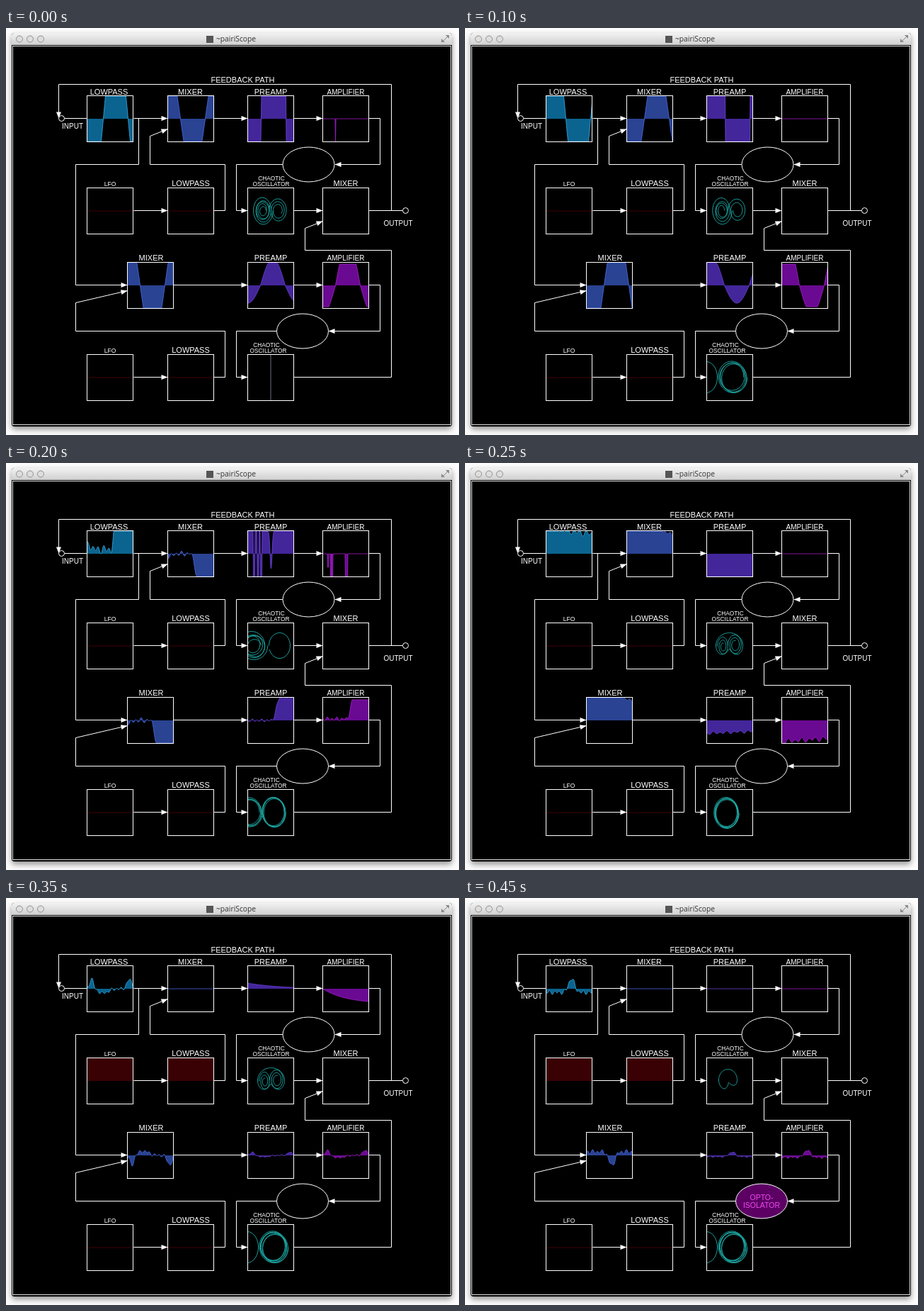
Recreate the animation shown at these times as an HTML page with a canvas. Size 640 px wide and 574 px high, loop 500 ms.

```html
<!DOCTYPE html>
<html lang="en">
<head>
<meta charset="utf-8">
<title>~pairiScope</title>
<style>
  html, body { margin: 0; width: 100%; height: 100%; overflow: hidden; background: #fdfdfd; }
  canvas { display: block; }
</style>
</head>
<body>
<canvas id="stage" width="640" height="574"></canvas>
<script>
const ctx = document.getElementById('stage').getContext('2d');
const { PI, sin, cos, abs, exp, sign, min, max } = Math;
const STEP = 50, SIZE = 65, MID = 32.5, MAX = 32;
const SANS = '"Liberation Sans", Arial, sans-serif';
const TEAL = '#1fb3ae';

const COLORS = {
  cyan: ['#0b648f', '#35a3d6'],
  blue: ['#2a4392', '#4766dc'],
  violet: ['#43269a', '#6a42d4'],
  purple: ['#6a0a92', '#a31cc8'],
  red: ['#390104', '#520008']
};

const BOX = {
  low: [114, 95], mix: [228, 95], pre: [341, 95], amp: [447, 95],
  lfo: [114, 225], lfoLow: [228, 225], chaos: [341, 225], out: [447, 225],
  mix2: [171, 330], pre2: [341, 330], amp2: [447, 330],
  lfo2: [114, 460], lfoLow2: [228, 460], chaos2: [341, 460]
};

const TRACES = {
  low: 'cyan', mix: 'blue', pre: 'violet', amp: 'purple',
  mix2: 'blue', pre2: 'violet', amp2: 'purple',
  lfo: 'red', lfoLow: 'red', lfo2: 'red', lfoLow2: 'red'
};

// Signals map x in a box (0 to SIZE) to a height above its middle line.
const clip = (v, limit = MAX) => max(-limit, min(limit, v));
const level = v => () => v;
const gain = (signal, k) => x => k * signal(x);
const wave = (x, zero) => sin(PI * (x - zero) / 35);
const bump = (x, at, width) => exp(-(((x - at) / width) ** 2));
const near = (x, width, ...centers) => centers.some(c => abs(x - c) <= width);
const ripple = (x, seed = 0) => sin(x * 0.92 + seed) + 0.6 * sin(x * 0.53 + 2 * seed);
function ramp(x, from, to) {
  const k = max(0, min(1, (x - from) / (to - from)));
  return k * k * (3 - 2 * k);
}

// Ellipses traced turn after turn, shrinking to "end" and wandering by "spread".
function orbit(cx, cy, rx, ry, { turns = 1, end = 1, spread = 0, start = 0 } = {}) {
  ctx.beginPath();
  const steps = Math.ceil(turns * 48);
  for (let i = 0; i <= steps; i++) {
    const k = i / steps, a = start + k * turns * 2 * PI;
    const r = 1 + (end - 1) * k + spread * sin(a * 0.38);
    const drift = spread * rx * cos(a * 0.61);
    ctx.lineTo(cx + drift + cos(a) * rx * r, cy + sin(a) * ry * r);
  }
  ctx.stroke();
}

// A ring dented from below.
function bean(cx, cy, rx, ry, dent) {
  ctx.beginPath();
  for (let a = -PI / 2; a <= PI * 1.5; a += 0.06) {
    const r = 1 - 0.75 * bump(a, dent, 0.5);
    ctx.lineTo(cx + cos(a) * rx * r, cy + sin(a) * ry * r);
  }
  ctx.closePath();
  ctx.stroke();
}

const rod = () => {
  ctx.fillStyle = '#776f80';
  ctx.fillRect(32, 0, 1, SIZE);
};
const coil = (turns, spread) => () => {
  orbit(-1, 32, 16, 22);
  orbit(37, 32, 18.5, 21, { turns, spread, end: 0.92 });
};
const butterfly = (left, right) => () => {
  orbit(21.5, 32, 13.5, 19.5, { turns: left, end: 0.3, spread: 0.05 });
  orbit(43, 32, 13, 17.5, { turns: right, end: 0.42, start: PI });
};
const heart = dx => () => {
  bean(32 + dx, 32, 19, 18, PI / 2);
  orbit(23 + dx, 33, 8, 14, { turns: 2.3, end: 0.3, start: PI });
  orbit(40 + dx, 31, 10, 15, { turns: 2.3, end: 0.4, start: PI });
};

// Clipped oscillation running through both chains.
function oscillating(lowZero, mixZero, extra) {
  const mix = x => clip(-80 * wave(x, mixZero));
  const pre2 = x => {
    const s = wave(x, mixZero);
    return clip(s * (s > 0 ? 38 : 25));
  };
  return {
    low: x => clip(120 * wave(x, lowZero)),
    mix, mix2: mix, pre2,
    pre: x => MAX * sign(wave(x, mixZero + 1)),
    amp2: x => clip(1.6 * pre2(x), 30),
    ...extra
  };
}

// Signals held near a rail; "sag" is how far they drop towards the right.
function saturated(sag, extra) {
  const mix = x => min(MAX, MAX - sag * (0.5 * ramp(x, 48, 65) + 0.14 * ramp(x, 48, 52) * ripple(x, 5)));
  const pre2 = x => -18 + sag * 0.33 * x / SIZE + 1.4 * ripple(x * 0.7, 2);
  return {
    low: x => min(MAX, 36 - sag * x / SIZE + 3 * ripple(x * 0.8, 4)),
    mix, mix2: mix, pre: level(-MAX), pre2,
    amp2: x => clip(1.65 * pre2(x)),
    chaos: heart(0),
    chaos2: () => orbit(28, 33, 17, 21.5, { turns: 5, end: 0.9, spread: 0.04 }),
    ...extra
  };
}

// Small ripples, with the slow oscillator at its top.
function quiet(low, extra) {
  return {
    low, mix2: gain(low, -1), pre2: gain(low, 0.33), amp2: gain(low, 0.52),
    lfo: level(MAX), lfoLow: level(MAX),
    chaos: heart(1), chaos2: coil(6, 0.09),
    ...extra
  };
}

const dip = x => 2 * ripple(x * 0.5, 2) * (1 - ramp(x, 14, 18)) - MAX * ramp(x, 16, 23);
const chatter = x => 6 + 4 * ripple(x * 0.9, 1) + 7 * bump(x, 3, 4);
const burst = x => -0.6 * (chatter(x) - 6) * (1 - ramp(x, 26, 34)) - MAX * ramp(x, 34, 41);
const twinLobes = x => 15 * bump(x, 6.5, 3.5) - 6 * bump(x, 23, 10) + 13 * bump(x, 60, 5) + 1.5 * ripple(x, 1);
const peak = x => 19 * bump(x, 36, 6) - 5 + 2 * ripple(x, 3);

const scenes = [
  oscillating(23, 18, {
    amp: x => near(x, 0.2, 18) ? -MAX : 0,
    chaos: butterfly(5, 2.6), chaos2: rod
  }),
  oscillating(1, -2, { chaos: butterfly(5.5, 2), chaos2: rod }),
  oscillating(-7, -10, { chaos: butterfly(4, 2), chaos2: coil(4, 0.09) }),
  {
    low: dip, mix: gain(dip, -1), mix2: gain(dip, -1),
    pre: x => near(x, 1, 13.5, 17) ? MAX : near(x, 3.5, 15) ? 0 : -MAX,
    amp: x => near(x, 0.5, 11.5) || near(x, 1, 17) ? -MAX : 0,
    pre2: x => -MAX * ramp(x, 16, 25),
    amp2: x => clip(ripple(x * 0.5) - 28 * bump(x, 23.5, 5) + 50 * bump(x, 44, 12), 31),
    opto: ['#780080', '#ff40ff'],
    chaos() {
      orbit(45, 32, 17, 23, { turns: 2.6, end: 0.75, spread: 0.04, start: 5 });
      orbit(55, -4, 3, 16);
    },
    chaos2() {
      coil(9, 0.16)();
      orbit(46, 30, 33, 27, { turns: 0.8, start: PI / 2 });
    }
  },
  {
    low: x => min(MAX, chatter(x) + MAX * ramp(x, 34, 40)),
    mix: burst, mix2: burst,
    pre: x => near(x, 1, 9, 14.5, 19) ? -MAX : MAX - 53 * bump(x, 33, 2),
    amp: x => near(x, 0.5, 11.5, 13.5) || near(x, 1.5, 33.5) ? -MAX : near(x, 0.5, 7.5) ? -19 : 0,
    pre2: x => 1.3 * ripple(x, 2) + MAX * ramp(x, 34, 46),
    amp2: x => clip(2 + 1.8 * ripple(x, 2) + 30 * ramp(x, 34, 44), 29),
    chaos() {
      orbit(8, 32, 18, 19, { turns: 5, end: 0.55, spread: 0.12 });
      orbit(45, 32, 15, 18, { turns: 0.95, start: PI });
    },
    chaos2() {
      orbit(3, 32, 17, 20, { turns: 4, end: 0.85, spread: 0.06 });
      orbit(37, 32, 15.5, 20, { turns: 4, spread: 0.06 });
    }
  },
  saturated(8),
  saturated(26, { opto: ['#09000e', '#e9e4ea'] }),
  quiet(twinLobes, {
    pre: x => 8 * exp(-x / 45),
    amp: x => -21 * (1 - exp(-x / 33))
  }),
  quiet(x => 5 * ripple(x * 0.6, 1)),
  quiet(peak, {
    opto: ['#5c0064', '#ef48f2'],
    chaos: () => bean(30, 31, 13, 15, PI / 2 - 0.3)
  })
];

function drawTrace(name, signal) {
  const [fill, line] = COLORS[TRACES[name]];
  const path = [];
  for (let x = 0; x <= SIZE; x += 0.5) path.push(x, MID - signal(x));
  polyline([0, MID, ...path, SIZE, MID]);
  ctx.fillStyle = fill;
  ctx.fill();
  ctx.strokeStyle = line;
  polyline(path);
  ctx.stroke();
}

function inBox(name, draw) {
  const [x, y] = BOX[name];
  ctx.save();
  ctx.translate(x + 0.5, y + 0.5);
  ctx.beginPath();
  ctx.rect(0, 0, SIZE, SIZE);
  ctx.clip();
  ctx.lineWidth = 0.9;
  ctx.strokeStyle = TEAL;
  draw();
  ctx.restore();
}

function polyline(pts) {
  ctx.beginPath();
  for (let i = 0; i < pts.length; i += 2) ctx.lineTo(pts[i], pts[i + 1]);
}

function text(str, x, y, size = 11, color = '#fff', family = SANS) {
  ctx.font = `${size}px ${family}`;
  ctx.fillStyle = color;
  ctx.fillText(str, x, y);
}

function wire(...pts) {
  polyline(pts.map(v => v + 0.5));
  ctx.stroke();
}

function arrow(...pts) {
  wire(...pts);
  const [x0, y0, x, y] = pts.slice(-4);
  ctx.save();
  ctx.translate(x + 0.5, y + 0.5);
  ctx.rotate(Math.atan2(y - y0, x - x0));
  polyline([0, 0, -9, -3.5, -9, 3.5]);
  ctx.fill();
  ctx.restore();
}

function ring(x, y, rx, ry = rx, fill = '#000') {
  ctx.beginPath();
  ctx.ellipse(x, y, rx, ry, 0, 0, 2 * PI);
  ctx.fillStyle = fill;
  ctx.fill();
  ctx.stroke();
}

function drawWindow() {
  ctx.fillStyle = '#fdfdfd';
  ctx.fillRect(0, 0, 640, 574);
  ctx.save();
  ctx.shadowColor = 'rgba(0,0,0,.42)';
  ctx.shadowBlur = 9;
  ctx.shadowOffsetY = 4;
  ctx.fillStyle = '#000';
  ctx.beginPath();
  ctx.roundRect(8, 7, 622, 555, 4);
  ctx.fill();
  ctx.restore();

  const bar = ctx.createLinearGradient(0, 7, 0, 24);
  bar.addColorStop(0, '#f2f2f2');
  bar.addColorStop(1, '#cfcfcf');
  ctx.fillStyle = bar;
  ctx.beginPath();
  ctx.roundRect(8, 7, 622, 17, [4, 4, 0, 0]);
  ctx.fill();
  ctx.lineWidth = 1;
  ctx.strokeStyle = '#e4e4e4';
  ctx.strokeRect(9.5, 25.5, 619, 534);

  ctx.strokeStyle = '#909090';
  for (const x of [19, 34, 49]) ring(x, 15.5, 4.5, 4.5, '#dedede');
  ctx.fillStyle = '#555';
  ctx.fillRect(283, 11, 10, 10);
  text('~pairiScope', 325, 19, 10.3, '#333', '"Open Sans", sans-serif');
  ctx.strokeStyle = ctx.fillStyle = '#888';
  wire(617, 18, 624, 11);
  polyline([621, 10, 626, 10, 626, 15]);
  ctx.fill();
  polyline([615, 15, 615, 20, 620, 20]);
  ctx.fill();
}

function drawWires() {
  ctx.strokeStyle = ctx.fillStyle = '#fff';
  ctx.lineWidth = 1;
  wire(82, 127, 114, 127);
  arrow(544, 257, 544, 79, 74, 79, 74, 127);
  arrow(187, 127, 187, 192, 98, 192, 98, 362, 171, 362);
  arrow(293, 127, 341, 127);
  arrow(293, 257, 309, 257, 309, 192, 203, 192, 203, 152, 228, 142);
  arrow(236, 362, 341, 362);
  arrow(293, 492, 309, 492, 309, 427, 98, 427, 98, 387, 171, 370);
  arrow(406, 257, 447, 257);
  wire(512, 257, 560, 257);
  arrow(406, 492, 544, 492, 544, 313, 422, 313, 422, 282, 447, 272);
  for (const y of [127, 257, 492]) arrow(180, y, 228, y);
  for (const [y, left] of [[127, 391], [362, 382]]) {
    arrow(406, y, 447, y);
    arrow(512, y, 528, y, 528, y + 65, left + 73, y + 65);
    arrow(left, y + 65, 325, y + 65, 325, y + 130, 341, y + 130);
  }
}

function drawLabels() {
  text('FEEDBACK PATH', 334.5, 77);
  text('LOWPASS', 145.5, 93.5);
  text('MIXER', 260.5, 93.5);
  text('INPUT', 94, 141.5, 10);
  text('OUTPUT', 554, 279, 10);
  text('MIXER', 480, 223);
  text('MIXER', 205, 328);
  for (const y of [93.5, 328]) {
    text('PREAMP', 374, y);
    text('AMPLIFIER', 480, y, 10);
  }
  for (const y of [222.5, 457.5]) {
    text('LFO', 147, y, 8.5);
    text('LOWPASS', 261, y + 0.5);
  }
  text('CHAOTIC', 375, 214.5, 8.3);
  text('OSCILLATOR', 374.5, 222.5, 8.3);
  text('CHAOTIC', 368, 450, 8.3);
  text('OSCILLATOR', 370.5, 457.5, 8.3);
}

function render(time) {
  const state = scenes[Math.floor(time / STEP) % scenes.length];
  ctx.textAlign = 'center';
  drawWindow();
  drawWires();
  for (const name in TRACES) inBox(name, () => drawTrace(name, state[name] || level(0)));
  inBox('chaos', state.chaos);
  inBox('chaos2', state.chaos2);

  ctx.strokeStyle = '#fff';
  ctx.lineWidth = 1;
  for (const [x, y] of Object.values(BOX)) ctx.strokeRect(x + 0.5, y + 0.5, SIZE, SIZE);
  const [optoFill, optoText] = state.opto || ['#000'];
  ring(78.5, 127.5, 4);
  ring(564.5, 257.5, 4);
  ring(427.5, 192.5, 36.5, 24.5);
  ring(419, 427.5, 36.5, 24.5, optoFill);
  if (optoText) {
    text('OPTO-', 419, 426, 10.5, optoText);
    text('ISOLATOR', 419, 437, 10.5, optoText);
  }
  drawLabels();
}

const begin = performance.now();
function tick() {
  render(performance.now() - begin);
  requestAnimationFrame(tick);
}
tick();
</script>
</body>
</html>
```
